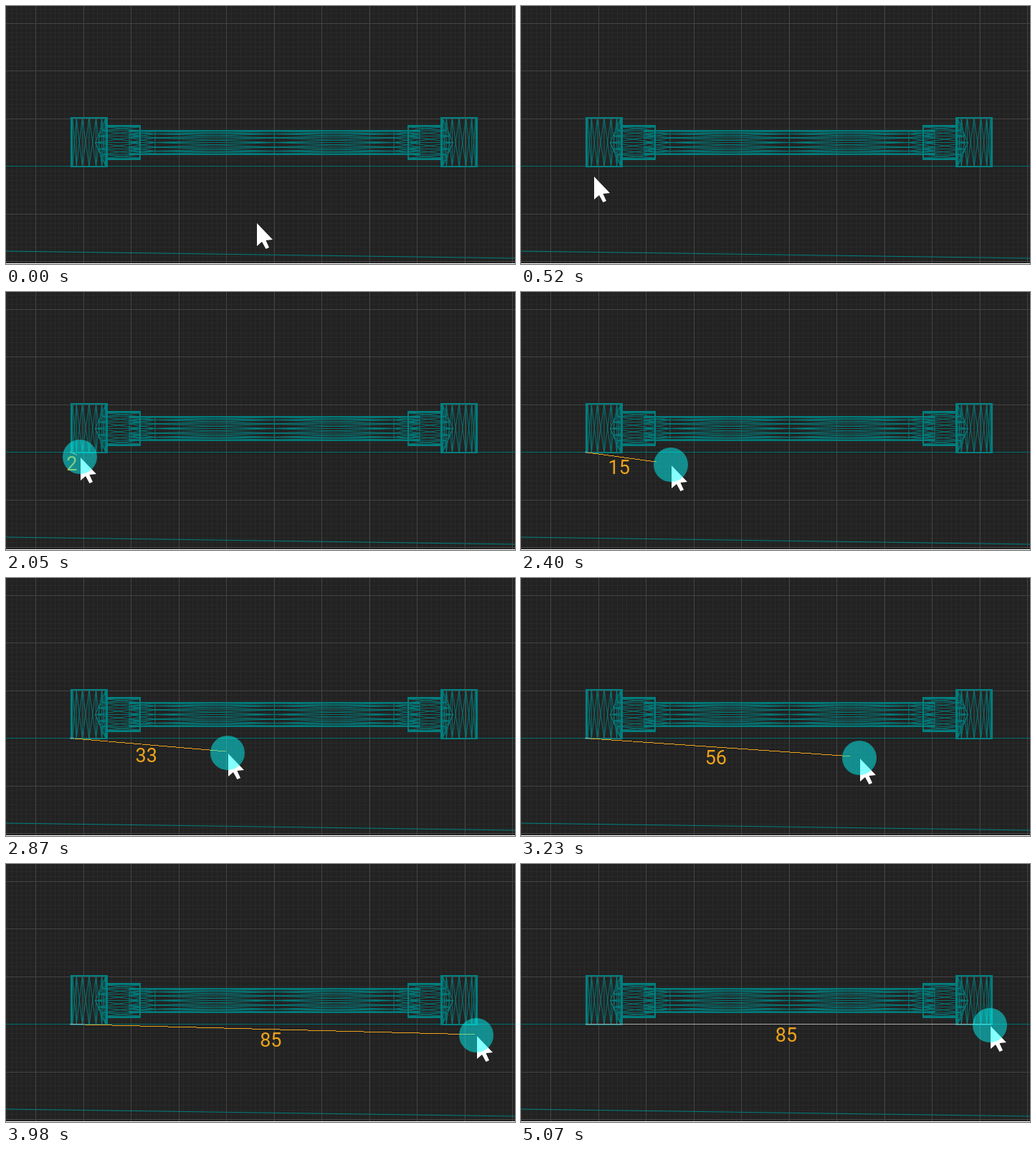
An HTML page that plays this animation: 710 px wide and 360 px high, repeating every 5680 ms.

```html
<!DOCTYPE html>
<html lang="en">
<head>
<meta charset="utf-8">
<title>Measuring tool</title>
<style>
  html, body { margin: 0; width: 100%; height: 100%; overflow: hidden; background: #222; }
  svg { display: block; width: 710px; height: 360px; }
  path, line { fill: none; }
  .crisp { shape-rendering: crispEdges; }
  #label { font: 27px Roboto, Arial, sans-serif; fill: #eda31a; text-anchor: middle; }
</style>
</head>
<body>
<svg viewBox="0 0 710 360">
  <defs>
    <!-- The measuring line turns pale where it lies on the axis. -->
    <linearGradient id="ink" gradientUnits="userSpaceOnUse" x1="0" y1="0" x2="0" y2="448">
      <stop offset=".5" stop-color="#aaa"/>
      <stop offset=".5" stop-color="#eda31a"/>
    </linearGradient>
    <g id="end" stroke="#008080">
      <path id="mesh" opacity=".85"/>
      <path id="frame" class="crisp" stroke-width="2"/>
    </g>
  </defs>
  <rect width="710" height="360" fill="#222"/>
  <path id="minor" class="crisp" stroke="#292929"/>
  <path id="major" class="crisp" stroke="#444"/>
  <path class="crisp" d="M0 223.5H710" stroke="#007070"/>
  <path class="crisp" d="M0 359.5H710" stroke="#fff"/>
  <line x1="0" y1="342" x2="710" y2="352" stroke="#008080"/>
  <path id="shaft" stroke="#008080" opacity=".9"/>
  <use href="#end"/>
  <use href="#end" transform="translate(748) scale(-1 1)"/>
  <line id="ruler" class="crisp" stroke="url(#ink)"/>
  <text id="label"></text>
  <path id="cross" class="crisp" d="M-19 0H20M0 -19V20" stroke="#e4e4e4" stroke-width="4"/>
  <polygon id="arrow" points="0,0 0,32 7,26 12.5,36 17,34 12.5,24 22,23"
    fill="#fff" stroke="#1a1a1a" paint-order="stroke"/>
  <circle id="press" r="24" fill="#0ff" opacity=".48"/>
</svg>
<script>
const LOOP = 5680, UNIT = 6.64, LAG = 28;
const $ = id => document.getElementById(id);
const seg = (x1, y1, x2, y2) => `M${x1} ${y1}L${x2} ${y2}`;
const ring = (centre, radius, count) =>
  Array.from({ length: count + 1 }, (_, i) => centre - radius * Math.cos(Math.PI * i / count));

function drawGrid() {
  const lines = (step, x0, y0) => {
    let d = '';
    for (let x = x0; x < 710; x += step) d += `M${Math.floor(x) + .5} 0V360`;
    for (let y = y0; y < 360; y += step) d += `M0 ${Math.floor(y) + .5}H710`;
    return d;
  };
  $('minor').setAttribute('d', lines(6.65, 1.6, 4.05));
  $('major').setAttribute('d', lines(66.5, 41.5, 24));
}

function drawPart() {
  let mesh = '';

  // Upright head: facet edges and crossing diagonals of front and back.
  const columns = ring(116, 25, 8);
  columns.forEach((x, i) => {
    mesh += `M${x} 156V224`;
    if (i) mesh += seg(columns[i - 1], 156, x, 224) + seg(columns[i - 1], 224, x, 156);
  });

  // Collar: runs from its intersection with the head to a flat end.
  const collar = ring(190.5, 23.5, 8).map(y => {
    const depth = 23.5 ** 2 - (y - 190.5) ** 2;
    return { x: 116 + Math.sqrt(25 ** 2 - depth), y };
  });
  collar.forEach((p, i) => {
    mesh += seg(p.x, p.y, 187, p.y);
    mesh += seg(p.x, p.y, columns[7], p.y < 190.5 ? 156 : 224);
    const next = collar[i + 1];
    if (next) mesh += seg(p.x, p.y, next.x, next.y)
      + seg(p.x, p.y, 187, next.y) + seg(next.x, next.y, 187, p.y);
  });
  $('mesh').setAttribute('d', mesh);
  $('frame').setAttribute('d', 'M91 156H141V224H91ZM141 167H187V214H141');

  // Shaft: long thin facets in four sections.
  const rows = ring(190.5, 17, 8), cuts = [172, 208, 374.5, 541, 577];
  let shaft = '';
  for (const x of cuts) shaft += `M${x} 173.5V207.5`;
  rows.forEach((y, i) => {
    shaft += `M172 ${y}H577`;
    if (!i) return;
    for (let k = 1; k < cuts.length; k++)
      shaft += seg(cuts[k - 1], rows[i - 1], cuts[k], y) + seg(cuts[k - 1], y, cuts[k], rows[i - 1]);
  });
  $('shaft').setAttribute('d', shaft);
}

// Pointer keys: [time, x, y]
const approach = [[20, 350, 303], [200, 282, 286], [400, 145, 250], [570, 96, 236]];
const aim = [[590, 100, 236], [1040, 95, 229], [1300, 95, 229], [1450, 89, 228]];
const drag = [
  [1890, 89, 226], [2150, 118, 234], [2300, 150, 237], [2370, 187, 239], [2400, 208, 241],
  [2440, 227, 242], [2700, 300, 244], [2870, 309, 244], [3010, 354, 246], [3230, 472, 251],
  [3590, 604, 252], [3800, 640, 246], [3980, 656, 239], [4110, 662, 235], [4270, 662, 235],
  [4440, 656, 229], [5030, 656, 229], [5070, 654, 225]
];

// Monotone cubic interpolation: smooth, without overshoot.
function along(keys, t) {
  const last = keys.length - 1;
  if (t <= keys[0][0]) return keys[0].slice(1);
  if (t >= keys[last][0]) return keys[last].slice(1);
  const i = keys.findIndex(k => k[0] > t) - 1;
  const slope = (n, c) => (keys[n + 1][c] - keys[n][c]) / (keys[n + 1][0] - keys[n][0]);
  const tangent = (n, c) => {
    if (n === 0 || n === last) return 0;
    const a = slope(n - 1, c), b = slope(n, c);
    return a * b > 0 ? 2 * a * b / (a + b) : 0;
  };
  const span = keys[i + 1][0] - keys[i][0], u = (t - keys[i][0]) / span;
  return [1, 2].map(c => {
    const ease = u * u * (3 - 2 * u);
    return keys[i][c] + (keys[i + 1][c] - keys[i][c]) * ease
      + span * u * (1 - u) * (tangent(i, c) * (1 - u) - tangent(i + 1, c) * u);
  });
}

function show(id, visible, [x, y] = [0, 0]) {
  $(id).style.display = visible ? '' : 'none';
  $(id).setAttribute('transform', `translate(${Math.round(x)} ${Math.round(y)})`);
}

function measure(t) {
  const active = t >= 1890, snapped = t >= 5070;
  show('ruler', active);
  show('label', active);
  if (!active) return;
  const x1 = 89.5, y1 = 223.5;
  const [x2, endY] = along(drag, t - LAG);
  const y2 = snapped ? y1 : endY - 2;
  Object.entries({ x1, y1, x2, y2 }).forEach(([name, v]) => $('ruler').setAttribute(name, v));
  const label = $('label');
  label.setAttribute('x', (x1 + x2) / 2 - 2.5);
  label.setAttribute('y', (y1 + y2) / 2 + 24);
  label.textContent = Math.round(Math.hypot(x2 - x1, y2 - y1) / UNIT);
}

function render(now) {
  const t = now % LOOP;
  const dragging = t >= 1890, held = along(drag, t).map(Math.round);
  show('arrow', t < 590 || dragging, dragging ? held.map(v => v + 1) : along(approach, t));
  show('cross', t >= 590 && !dragging, along(aim, t));
  show('press', t >= 1730, held);
  measure(t);
}

drawGrid();
drawPart();
const start = performance.now();
(function tick() {
  render(performance.now() - start);
  requestAnimationFrame(tick);
})();
</script>
</body>
</html>
```
